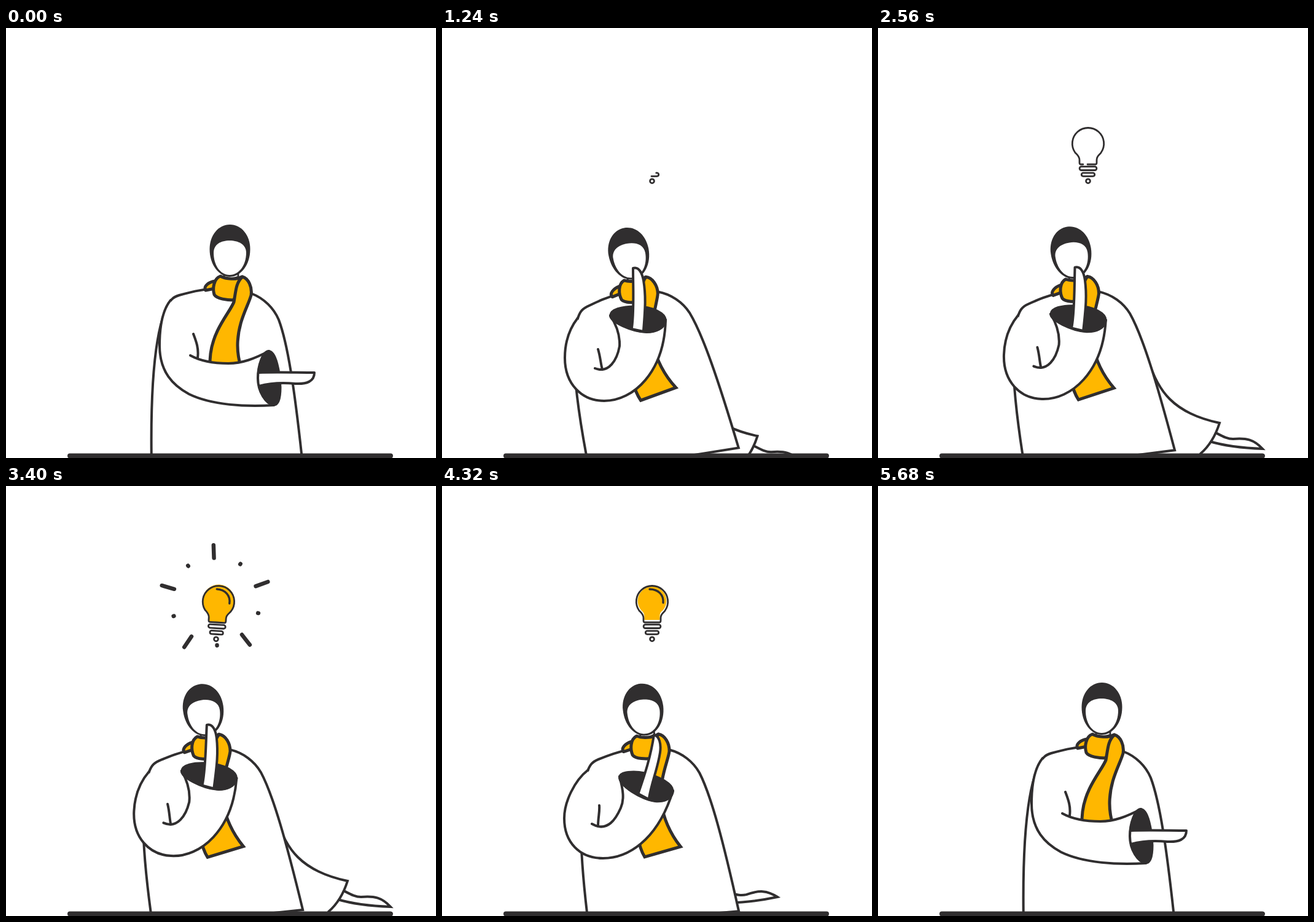
Write an HTML page that moves like this. It is 700 px wide and 700 px high and loops after 6000 ms.

```html
<!DOCTYPE html>
<html lang="en">
<head>
<meta charset="utf-8">
<title>Idea</title>
<style>
  html, body { margin: 0; width: 100%; height: 100%; overflow: hidden; background: #fff; }
  svg { display: block; width: 100%; height: 100%; }
  .line { fill: none; stroke: #302e2f; stroke-width: 4; stroke-linecap: round; stroke-linejoin: round; }
  .white { fill: #fff; }
  .dark { fill: #302e2f; }
  .gold { fill: #ffb700; }
  .thick { stroke-width: 5; }
  .thin { stroke-width: 2.8; }
  .sharp { stroke-linejoin: miter; }
</style>
</head>
<body>
<svg viewBox="0 0 700 700">
  <defs>
    <clipPath id="room"><rect width="700" height="694"/></clipPath>
  </defs>

  <g id="rays" class="line"></g>

  <g id="bulb">
    <path id="glow" class="gold" d="M328 221V214C328 208 324 205 322 203A26 26 0 1 1 362 203C358 206 356 208 356 214V221Z"/>
    <path id="shine" class="line" style="stroke-width:3.4" pathLength="100" d="M338 168C352 168 361 177 360 190"/>
    <path id="glass" class="line thin" pathLength="100" d="M341 222H354Q356 222 356 219V215C356 208 361 206 363 203A25.7 25.7 0 1 0 321 203C324 206 328 209 328 215V219Q328 222 330 222H341"/>
    <path id="ring1" class="line thin" pathLength="100" d="M342 231.5H353A2.9 2.9 0 0 0 353 225.7H331A2.9 2.9 0 0 0 331 231.5Z"/>
    <path id="ring2" class="line thin" pathLength="100" d="M341 241.3H350A2.7 2.7 0 0 0 350 235.9H334A2.7 2.7 0 0 0 334 241.3Z"/>
    <path id="knob" class="line thin" pathLength="100" d="M342 252.6A3.4 3.4 0 0 0 342 245.8A3.4 3.4 0 0 0 342 252.6"/>
  </g>

  <g clip-path="url(#room)">
    <path id="foot" class="line white sharp" d="M548 658C560 664 568 669 578 669C600 667 612 670 626 685C600 684 570 682 540 673"/>
    <path id="train" class="line white sharp" d="M440 540C455 590 480 627 556 643C550 662 540 680 525 693"/>
    <g id="body">
      <path class="line white sharp" d="M237 712C235 600 240 500 262 454C268 442 272 438 282 435C300 430 315 426 340 424L399 432C420 440 436 456 444 475C459 515 470 590 482.5 706L360 703Z"/>
      <path class="line white thin" d="M355 400V406Q366 410 378 405V398"/>
      <path class="line gold thick" d="M340 412C329 414 321 421 325 427L340 424Z"/>
      <path class="line gold thick" d="M349 404C338 408 336 424 339 434C343 441 360 443 371 443L384 405C375 410 358 409 349 404Z"/>
      <path class="line gold thick sharp" d="M385 405C395 408 401 422 399 435C395 451 377 478 377 517C377 540 385 567 400 591L340 601C331 582 331 547 333 530C338 490 365 462 371 446C374 430 374 414 385 405Z"/>
      <path class="dark" d="M331.5 360C331.5 337 346 320 364.5 320S397.5 337 397.5 360C397.5 386 382 405 364.5 405S331.5 386 331.5 360Z"/>
      <path class="white" d="M338 366C338 352 350 346 364 346S391 352 391 366C391 385 380 402 364 402S338 385 338 366Z"/>
      <path id="sleeve" class="white"/>
      <path id="cuff" class="line dark" style="stroke-width:3"/>
      <path id="hand" class="line white"/>
      <path id="rim" class="line"/>
      <path id="outer" class="line"/>
      <path id="inner" class="line"/>
      <path id="fold" class="line"/>
    </g>
  </g>
  <path class="line" style="stroke-width:8" d="M104 696.5H626"/>
</svg>

<script>
const LOOP = 6000, STEP = 40;
const HIP = [360, 693], ELBOW = [275, 545];
const $ = id => document.getElementById(id);
const clamp = x => Math.max(0, Math.min(1, x));
const span = (t, a, b) => clamp((t - a) / (b - a));
const mix = (a, b, k) => a + (b - a) * k;
const linear = u => u;
const smooth = u => (1 - Math.cos(Math.PI * u)) / 2;
const sineOut = u => Math.sin(Math.PI * u / 2);
const quadIn = u => u * u;

function turn([x, y], deg, [cx, cy] = [0, 0]) {
  const r = deg * Math.PI / 180, c = Math.cos(r), s = Math.sin(r);
  x -= cx; y -= cy;
  return [cx + x * c - y * s, cy + x * s + y * c];
}
const mixPt = (p, q, k) => [mix(p[0], q[0], k), mix(p[1], q[1], k)];
const mixPts = (a, b, k) => a.map((p, i) => mixPt(p, b[i], k));
const points = s => s.split(' ').map(p => p.split(',').map(Number));
const num = p => p[0].toFixed(2) + ' ' + p[1].toFixed(2);
const curves = pts => 'C' + pts.map(num).join(' ');
const path = pts => 'M' + num(pts[0]) + curves(pts.slice(1));

// An arm pose is given on stage at body angle `lean`; it is stored upright,
// with cuff and hand relative to the wrist.
function pose(lean, aim, wrist, shape) {
  const upright = p => turn(p, -lean, HIP);
  const out = { aim: aim - lean, wrist: upright(wrist) };
  for (const part in shape) {
    out[part] = points(shape[part]).map(upright);
    if (part === 'cuff' || part === 'hand')
      out[part] = out[part].map(p =>
        turn([p[0] - out.wrist[0], p[1] - out.wrist[1]], -out.aim));
  }
  return out;
}

const rest = pose(0, 0, [428, 570], {
  outer: '268,443 254,460 250,490 250,517 250,560 272,582 298,596 335,614 390,617',
  inner: '405,538 385,546 362,546 340,546 318,543 300,533',
  fold: '305,498 310,511 314,522 312,537',
  cuff: '428,526 440,526 446,560 447,585 447,603 444,614 436,614 423,612 410,592 410,570 410,550 418,526 428,526',
  hand: '411,561 440,560 475,561 502,561 502,575 490,580 471,579 450,577 430,578 412,583'
});
const think = pose(-10.5, -93, [319, 474], {
  outer: '221,472 207,490 200,512 200,537 200,580 228,607 264,607 312,607 362,560',
  inner: '285,485 290,500 289,518 285,540 272,563 249,554',
  fold: '254,523 258,536 258,545 261,556',
  cuff: '274,468 274,458 292,453 315,453 345,453 364,465 364,475 363,489 348,495 333,495 308,494 274,478 274,468',
  hand: '309,488 313,460 311,425 311,391 321,388 326,400 328,411 332,435 331,455 328,492'
});
const leave = pose(-6.4, -78.5, [333, 488], {
  outer: '238,462 215,480 199,515 199,541 199,580 224,606 262,606 300,606 350,580',
  inner: '295,495 297,510 291,524 284,540 270,565 244,550',
  fold: '256,520 257,530 254,540 254,554',
  cuff: '289,473 290,465 312,463 330,467 355,473 376,485 376,496 375,510 360,514 347,513 325,510 288,488 289,473',
  hand: '320,499 330,470 340,440 345,405 354,407 357,420 355,434 351,460 342,480 337,508'
});
const low = pose(0, 16, [420, 597], {
  outer: '268,443 252,460 249,490 249,515 249,560 268,580 300,600 330,616 385,637',
  inner: '415,560 400,561 385,560 360,558 325,550 299,535',
  fold: '305,499 310,512 314,522 311,538',
  cuff: '431,553 441,553 443,578 440,593 436,622 428,640 418,640 404,640 400,622 400,605 400,580 417,553 431,553',
  hand: '408,584 440,590 470,600 494,606 492,617 480,620 466,618 445,612 430,603 403,603'
});

// from, to, pose, pose, ease, elbow swing, swing timing, reach
const MOVES = [
  [0, 620, rest, think, smooth, 30, u => u * u, 0],
  [620, 4000, think, think, linear, 0, linear, 0],
  [4000, 4320, think, leave, quadIn, 0, linear, 0],
  [4320, 4960, leave, low, sineOut, 48, Math.sqrt, 0],
  [4960, 5680, low, rest, smooth, 0, linear, 9],
  [5680, LOOP, rest, rest, linear, 0, linear, 0]
];
const SWING = {
  outer: [0, .3, .8, 1, 1, .6, .4, .2, 0],
  inner: [0, 0, .2, .3, .4, .5],
  fold: [.5, .5, .5, .5]
};

const polar = p => {
  const x = p[0] - ELBOW[0], y = p[1] - ELBOW[1];
  return [Math.hypot(x, y), Math.atan2(y, x)];
};

function drawArm(t) {
  const [a, b, p, q, ease, swing, when, reach] = MOVES.find(m => t < m[1]);
  const u = span(t, a, b), k = ease(u);
  const push = swing * Math.sin(Math.PI * when(u));
  const [r, ang] = mixPt(polar(p.wrist), polar(q.wrist), k);
  const aim = mix(p.aim, q.aim, k);
  const ext = turn([reach * Math.sin(Math.PI * u), 0], aim);
  const wx = ELBOW[0] + r * Math.cos(ang) + ext[0];
  const wy = ELBOW[1] + r * Math.sin(ang) + ext[1];

  const rigid = part => mixPts(p[part], q[part], k).map(pt => {
    const [x, y] = turn(pt, aim);
    return [wx + x, wy + y];
  });
  const soft = part => mixPts(p[part], q[part], k)
    .map(([x, y], i) => [x - push * SWING[part][i], y]);

  const cuff = rigid('cuff'), rim = cuff.slice(6);
  const outer = [...soft('outer'), cuff[6]];
  const inner = [cuff[0], ...soft('inner')];
  const set = (id, d) => $(id).setAttribute('d', d);
  set('sleeve', path(outer) + curves(rim.slice(1)) + curves(inner.slice(1)) + 'Z');
  set('cuff', path(cuff) + 'Z');
  set('hand', path(rigid('hand')));
  set('rim', path(rim));
  set('outer', path(outer));
  set('inner', path(inner));
  set('fold', path(soft('fold')));
}

// time, body angle, ease towards it
const LEAN = [
  [0, 0, linear], [640, -11.3, smooth], [1240, -10.5, linear], [2560, -8.7, linear],
  [3400, -7.5, linear], [4320, -6.4, linear], [4880, 0, smooth], [LOOP, 0, linear]
];
function leanAt(t) {
  const i = LEAN.findIndex(k => t < k[0]);
  const [a, from] = LEAN[i - 1], [b, to, ease] = LEAN[i];
  return mix(from, to, ease(span(t, a, b)));
}

function drawLeg(t) {
  const come = 1 - smooth(span(t, 560, 1800));
  const go = smooth(span(t, 3960, 4680));
  const x = -100 * come, y = 50 * come;
  const shown = t > 560 && t < 4680 ? 'visible' : 'hidden';
  $('train').setAttribute('transform', `translate(${x - 180 * go} ${y})`);
  $('foot').setAttribute('transform',
    `translate(${x - 160 * go} ${y - 32 * go}) rotate(${-28 * go} 626 685)`);
  $('train').style.visibility = $('foot').style.visibility = shown;
}

// id, drawn from, to, erased from, to
const TRACES = [
  ['knob', 600, 1000, 5440, 5640],
  ['ring2', 1080, 1500, 5260, 5480],
  ['ring1', 1400, 1820, 5100, 5300],
  ['glass', 1782, 2592, 4480, 4960],
  ['shine', 2960, 3240, 4400, 4520]
];

function drawBulb(t) {
  for (const [id, a, b, c, d] of TRACES) {
    const k = span(t, a, b) - span(t, c, d), s = $(id).style;
    s.visibility = k > 0 ? 'visible' : 'hidden';
    s.strokeDasharray = k < 1 ? `${k * 100} 200` : 'none';
  }
  const size = sineOut(span(t, 2600, 3120)) * (1 - quadIn(span(t, 4240, 4480)) * .9);
  const on = t < 4480 ? size : 0;
  $('glow').setAttribute('transform', `translate(342 192) scale(${on}) translate(-342 -192)`);
  const shake = t > 3300 && t < 4100 ? 3.7 * Math.sin(Math.PI * (t - 3300) / 200) : 0;
  $('bulb').setAttribute('transform', `rotate(${shake} 342 249)`);
}

function drawRays(t) {
  const s = Math.sin(Math.PI * span(t, 3240, 4140));
  const far = 50 + 77 * s, len = 21 * Math.min(1, 2 * s), dot = 42 + 58 * s;
  let out = '';
  for (let i = 0; i < 5; i++) {
    out += `<g transform="rotate(${i * 72 - 2})">` +
      `<path stroke-width="6.5" d="M0 ${-far}V${len - far}"/></g>` +
      `<g transform="rotate(${i * 72 + 34})">` +
      `<path stroke-width="6.5" d="M0 ${-dot}v.8"/></g>`;
  }
  const g = $('rays');
  g.innerHTML = out;
  g.style.strokeWidth = 6.5;
  g.setAttribute('transform', 'translate(341 187)');
  g.style.opacity = s > .01 ? Math.min(1, 4 * s) : 0;
}

function draw(t) {
  $('body').setAttribute('transform', `rotate(${leanAt(t)} ${HIP})`);
  drawArm(t);
  drawLeg(t);
  drawBulb(t);
  drawRays(t);
}

const start = performance.now();
function tick() {
  const t = (performance.now() - start) % LOOP;
  draw(Math.floor(t / STEP) * STEP);
  requestAnimationFrame(tick);
}
tick();
</script>
</body>
</html>
```
